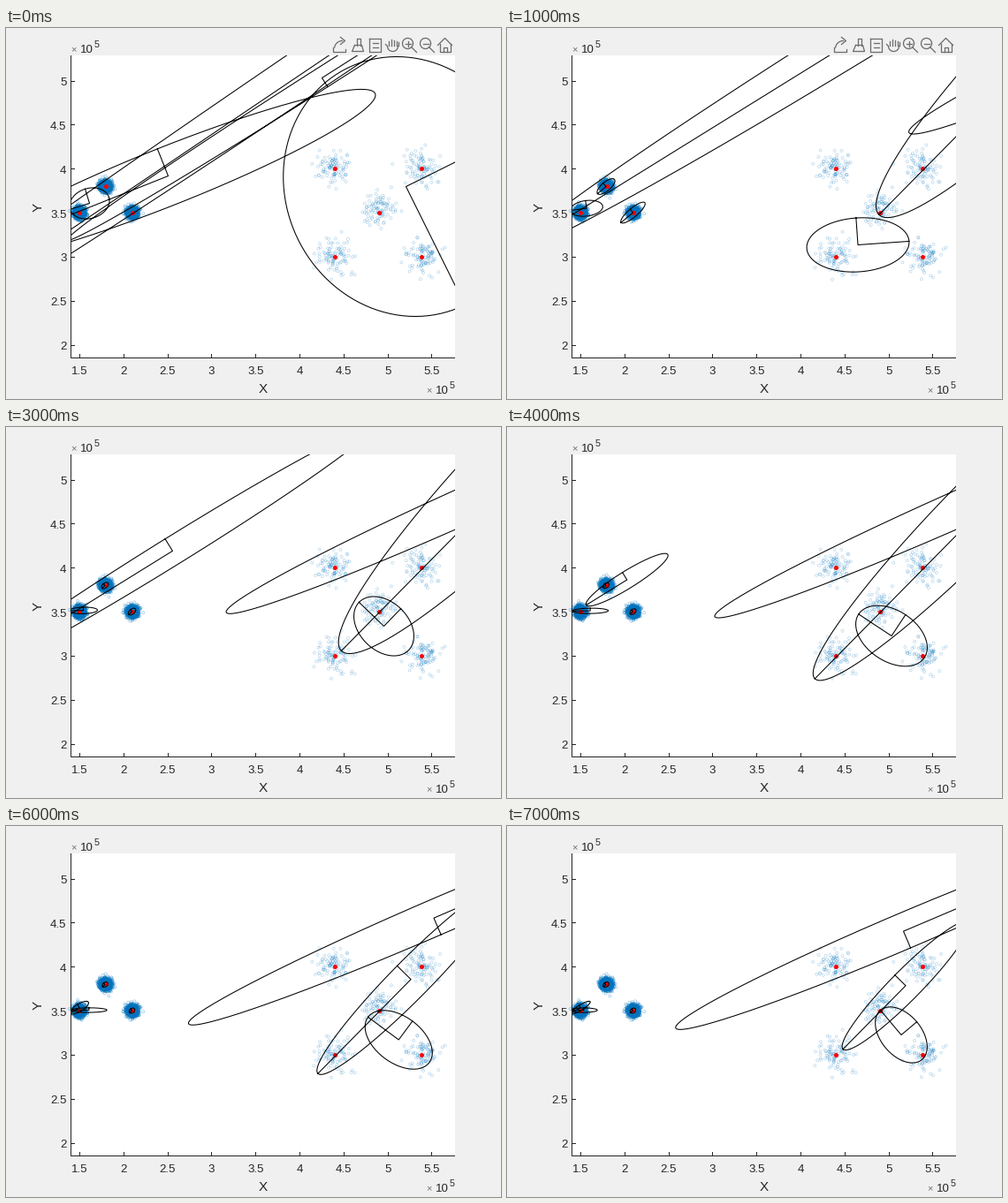
Animation of 560 by 420 pixels, one loop 8000 ms. Source, as a matplotlib script:

```python
import numpy as np
import matplotlib.pyplot as plt
from matplotlib.animation import FuncAnimation
from matplotlib.patches import Rectangle

W, H = 560, 420
PX = 0.72                                  # points per pixel at 100 dpi
LEFT, RIGHT, TOP, BOTTOM = 73, 507, 31, 373
INK, GREY, BLUE = "#262626", "#6e6e6e", "#0072bd"
STEPS = 8

plt.rcParams["font.family"] = "Liberation Sans"
fig = plt.figure(figsize=(W / 100, H / 100), dpi=100, facecolor="#f0f0f0")
ax = fig.add_axes([0, 0, 1, 1])
ax.set_xlim(0.5, W + 0.5)                  # whole numbers are pixel centres
ax.set_ylim(H + 0.5, 0.5)
ax.axis("off")

plot_area = Rectangle((LEFT, TOP), RIGHT - LEFT + 1, BOTTOM - TOP,
                      facecolor="white", edgecolor="none", zorder=0)
ax.add_patch(plot_area)


def to_px(x, y):
    return 83.5 + (x - 1.5) * 99.6, 60 + (5 - y) * 99.7


def stroke(points, color=INK, width=1.0, **kw):
    x, y = zip(*points)
    return ax.plot(x, y, color=color, lw=width * PX, **kw)[0]


def label(x, y, text, size=13.3, **kw):
    kw = {"ha": "center", "va": "center_baseline", "color": INK, **kw}
    ax.text(x, y, text, fontsize=size * PX, **kw)


def exponent(x, y):
    label(x, y, "×", 11, ha="left", color="#707070")
    label(x + 10, y, "10", 13.3, ha="left")
    label(x + 26, y - 5, "5", 10.7, ha="left")


def draw_axes():
    stroke([(LEFT, TOP), (LEFT, BOTTOM), (RIGHT, BOTTOM)], zorder=5,
           solid_joinstyle="miter")
    for v in np.arange(1.5, 5.6, 0.5):
        x, _ = to_px(v, 0)
        stroke([(x, BOTTOM), (x, BOTTOM - 4)], zorder=5)
        label(x, 388, f"{v:g}")
    for v in np.arange(2, 5.1, 0.5):
        _, y = to_px(0, v)
        stroke([(LEFT, y), (LEFT + 4, y)], zorder=5)
        label(69, y + 1, f"{v:g}", ha="right")
    label(291, 408, "X", 15.3)
    label(37, 203, "Y", 15.3, rotation=90, va="center")
    exponent(74, 24)
    exponent(476, 410)


def draw_samples():
    rng = np.random.default_rng(7)
    dense = [(1.5, 3.5), (1.8, 3.8), (2.1, 3.5)]
    sparse = [(4.4, 4), (5.39, 4), (4.9, 3.5), (4.4, 3), (5.39, 3)]
    for means, count, spread, alpha in ((sparse, 100, 10.2, 0.28),
                                        (dense, 1000, 3.3, 0.4)):
        means = [to_px(*m) for m in means]
        pts = np.vstack([rng.normal(m, spread, (count, 2)) for m in means])
        ax.scatter(*pts.T, s=(3 * PX) ** 2, facecolors="none",
                   edgecolors=BLUE, linewidths=0.5, alpha=alpha, zorder=1)
        ax.scatter(*np.transpose(means), s=(5 * PX) ** 2, color="red",
                   linewidths=0, zorder=2)


def arc(cx, cy, r, start=0, end=360):
    t = np.radians(np.linspace(start, end, 40))
    return list(zip(cx + r * np.cos(t), cy + r * np.sin(t)))


def draw_toolbar():
    parts = [
        # export
        [(370, 22), (370, 27), (384, 27), (384, 24)],
        arc(381, 24, 9, 190, 270), [(379, 11), (384, 15), (379, 19)],
        # brush
        [(397, 20), (397, 12), (401, 12), (401, 20)],
        [(395, 20), (403, 20), (405, 27), (392, 27), (395, 20)],
        # data tip
        [(411, 12), (424, 12), (424, 27), (411, 27), (411, 12)],
        [(415, 17), (421, 17)], [(415, 22), (421, 22)],
        # pan
        arc(438, 21, 6, 0, 180) + [(430, 19)],
        # home
        [(489, 20), (497, 12), (505, 20)],
        [(491, 18), (491, 27), (503, 27), (503, 18)],
        [(495, 27), (495, 22), (499, 22), (499, 27)],
    ]
    parts += [[(x, 20), (x, 13 + abs(x - 437) / 2)]
              for x in (433, 436, 439, 442, 444)]
    for cx in (455, 475):
        parts += [arc(cx, 18, 6), [(cx + 4, 22), (cx + 10, 28)],
                  [(cx - 3, 18), (cx + 3, 18)]]
    parts.append([(455, 15), (455, 21)])
    return [stroke(p, GREY, 1.3) for p in parts]


def ellipse(cx, cy, a, b, angle):
    """Outline, then the two half axes joined at the centre."""
    th = np.radians(angle)
    major = a * np.array([np.cos(th), np.sin(th)])
    minor = b * np.array([-np.sin(th), np.cos(th)])
    t = np.linspace(0, 2 * np.pi, 241)[:, None]
    centre = np.array([cx, cy])
    gap = [[np.nan, np.nan]]
    outline = centre + np.cos(t) * major + np.sin(t) * minor
    return np.vstack([outline, gap,
                      [centre + major, centre, centre + minor], gap])


KEYS = (1, 2, 3, 5, 7)


def at(step, values):
    return np.interp(step, KEYS, values)


def size_at(step, values):
    """Sizes grow and shrink geometrically."""
    return np.exp(at(step, np.log(values)))


def band(pivot, heading, along, a, b):
    """Ellipse whose centre slides on a line through the pivot."""
    th = np.radians(heading)
    return (pivot[0] + along * np.cos(th), pivot[1] + along * np.sin(th),
            a, b, heading)


def lower_band(s):
    return band((72.5, 213), 148.2, at(s, (-476, -282, -137, -13, -13)),
                size_at(s, (551, 377, 268, 11, 13)),
                size_at(s, (26, 23, 16, 6, 3)))


def steep_band(s):
    return band((507, 125), 134.6, at(s, (-165, -226, -153, 59, 79)),
                size_at(s, (287, 387, 334, 222, 101)),
                size_at(s, (52, 59, 55, 28, 17)))


def shallow_band(s):
    return band((507, 95), 0.28 * s - 25, at(s, (188, 41, 24, 14, -63)),
                size_at(s, (245, 290, 306, 326, 280)), 20.5)


def roamer(s):
    return (at(s, (397.5, 456, 428, 443, 446.5)),
            at(s, (246, 245, 226, 248, 237)),
            size_at(s, (30.5, 43, 39, 51, 36.5)),
            size_at(s, (58, 42.5, 27.5, 30, 23)),
            at(s, (266, 258, 224, 203, 230)))


def left_cluster(s):
    """Settles flat on its cluster, with one swell late in the run."""
    k, swell = 2.3 ** -s, np.exp(-(s - 5) ** 2)
    return (87 + 8 * k + 20 * swell, 209 - 10 * k, 15 + 8 * k + 14 * swell,
            2.5 + 14.5 * k, 180 - 17 * k)


def small_cluster(s, centre, extra):
    k = 3.0 ** (1 - s)
    return *centre, 3.5 + extra * k, 2.5 + 2.5 * k, 140


FIRST_GUESS = [(453, 180, 136, 149.6, -26.4), (184, 168, 252, 33, 158.3),
               (358, 57, 342, 12, -32.5), (420, -5, 800, 27, 146)]


def poses(s):
    if s == 0:
        return FIRST_GUESS + [left_cluster(s)]
    return [lower_band(s), steep_band(s), shallow_band(s), roamer(s),
            left_cluster(s), small_cluster(s, (112.5, 180), 9),
            small_cluster(s, (143, 209.5), 14)]


draw_axes()
draw_samples()
toolbar = draw_toolbar()
curves = ax.plot([], [], color="black", lw=1.05 * PX, zorder=3)[0]
curves.set_clip_path(plot_area)


def update(step):
    curves.set_data(*np.vstack([ellipse(*p) for p in poses(step)]).T)
    alpha = np.interp(step, (1, 2, 3), (1, 0.3, 0))
    for part in toolbar:
        part.set_alpha(alpha)
    return [curves, *toolbar]


anim = FuncAnimation(fig, update, frames=STEPS, interval=1000, repeat=True,
                     repeat_delay=0)
plt.show()
```
